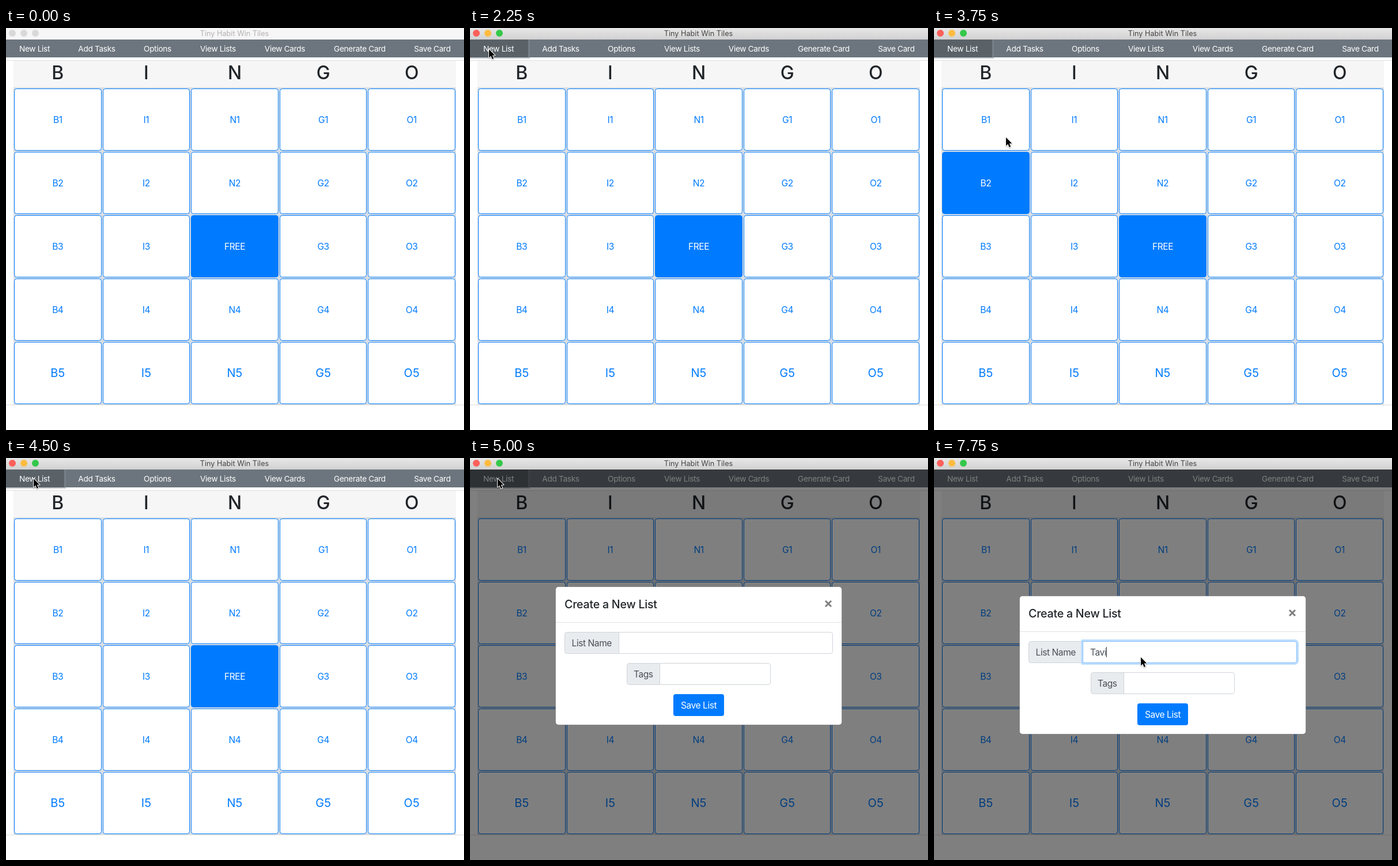
Animation, 795 px wide and 698 px high, one loop 8 s. Source, as an HTML page with a canvas:

```html
<!DOCTYPE html>
<html lang="en">
<head>
<meta charset="utf-8">
<title>Tiny Habit Win Tiles</title>
<style>
html, body { margin: 0; width: 100%; height: 100%; overflow: hidden; background: #fff; }
canvas { display: block; width: 795px; height: 698px; }
</style>
</head>
<body>
<canvas id="stage" width="795" height="698"></canvas>
<script>
const ctx = document.getElementById('stage').getContext('2d');
const LOOP = 8000, TICK = 250;
const BLUE = [0, 123, 255], WHITE = [255, 255, 255];
const TITLE = 'Tiny Habit Win Tiles', TYPED = 'Tavi';
const NAV = [['New List', 49.5], ['Add Tasks', 157.5], ['Options', 263], ['View Lists', 368],
  ['View Cards', 484], ['Generate Card', 614], ['Save Card', 740]];

// Pointer stops: time, x, y
const PATH = [
  [250, 638, 103], [500, 400, 80], [750, 185, 40], [1000, 70, 24], [1250, 31, 36], [1500, 33, 37],
  [2750, 33, 37], [3000, 178, 246], [3250, 190, 256], [3500, 186, 250], [3750, 125, 190],
  [4000, 62, 95], [4250, 49, 40], [4500, 48, 36], [5250, 48, 36],
  [5500, 140, 150], [5750, 318, 318], [6000, 359, 346]
];

// Hover fades: cell, time, strength
const HOVERS = [['B1', 3000, .35], ['B2', 3000, .02], ['I2', 3250, 1], ['I2', 3500, 1],
  ['B2', 3750, 1], ['B1', 4000, .35]];

const clamp = v => Math.max(0, Math.min(1, v));
const mix = (a, b, p) => `rgb(${a.map((v, i) => Math.round(v + (b[i] - v) * p)).join()})`;

function rect(x, y, w, h, fill) {
  ctx.fillStyle = fill;
  ctx.fillRect(x, y, w, h);
}

function box(x, y, w, h, radii, fill, stroke) {
  ctx.beginPath();
  if (stroke) ctx.roundRect(x + .5, y + .5, w - 1, h - 1, radii);
  else ctx.roundRect(x, y, w, h, radii);
  ctx.fillStyle = fill;
  ctx.fill();
  if (stroke) {
    ctx.lineWidth = 1;
    ctx.strokeStyle = stroke;
    ctx.stroke();
  }
}

// y is the middle of the capitals
function text(str, x, y, size, color, { weight = 400, align = 'center', track = 0 } = {}) {
  ctx.font = `${weight} ${size}px Inter, Roboto, sans-serif`;
  ctx.letterSpacing = `${track * size}px`;
  ctx.textAlign = align;
  ctx.fillStyle = color;
  ctx.fillText(str, x, Math.round(y + size * .364));
  return ctx.measureText(str).width;
}

function pointerAt(t) {
  if (t < PATH[0][0]) return null;
  let i = 0;
  while (i < PATH.length - 1 && PATH[i + 1][0] <= t) i++;
  const a = PATH[i], b = PATH[i + 1] || a;
  const p = b === a ? 0 : (t - a[0]) / (b[0] - a[0]);
  return [a[1] + (b[1] - a[1]) * p, a[2] + (b[2] - a[2]) * p];
}

function drawPointer([x, y]) {
  ctx.save();
  ctx.translate(x, y);
  ctx.beginPath();
  [[0, 0], [0, 14.5], [3.3, 11.4], [5.7, 17], [8.2, 16], [5.8, 10.5], [10.4, 10.5]]
    .forEach(p => ctx.lineTo(...p));
  ctx.closePath();
  ctx.shadowColor = 'rgba(0,0,0,.3)';
  ctx.shadowBlur = 2;
  ctx.shadowOffsetY = 1;
  ctx.lineWidth = 2;
  ctx.lineJoin = 'round';
  ctx.strokeStyle = '#fff';
  ctx.stroke();
  ctx.shadowColor = 'transparent';
  ctx.fillStyle = '#000';
  ctx.fill();
  ctx.restore();
}

function drawTitleBar(active) {
  const g = ctx.createLinearGradient(0, 0, 0, 20);
  g.addColorStop(0, active ? '#e7e7e7' : '#f6f6f6');
  g.addColorStop(1, active ? '#d1d1d1' : '#f6f6f6');
  rect(0, 0, 795, 20, g);
  const lights = active ? ['#fc605b', '#fdbc40', '#34c84a'] : Array(3).fill('#d9d9d9');
  lights.forEach((c, i) => {
    ctx.beginPath();
    ctx.arc(11 + 20 * i, 9, 6, 0, 7);
    ctx.fillStyle = c;
    ctx.fill();
  });
  text(TITLE, 396.5, 9.5, 12.7, active ? '#444' : '#b2b2b2');
}

function drawNav(focused) {
  rect(0, 20, 795, 31, '#6c757d');
  if (focused) {
    rect(0, 20, 104, 33, 'rgba(130,138,145,.5)');
    rect(0, 20, 101, 31, '#5a6268');
  }
  NAV.forEach(([label, x]) => text(label, x, 36, 13.7, '#fff', { track: -.025 }));
}

function drawBoard(t) {
  rect(0, 56, 795, 1, '#dfdfdf');
  rect(13, 57, 768, 46, '#f6f6f7');
  rect(13, 103, 768, 552, '#d9dee3');
  rect(0, 654, 795, 1, '#dfdfdf');
  [...'BINGO'].forEach((letter, col) => {
    const left = 13 + 153.6 * col, mid = left + 76.8;
    text(letter, mid, 77, 32, '#212529', { weight: 500 });
    const x = Math.round(left + 1), w = Math.round(left + 152.6) - x;
    for (let row = 1; row <= 5; row++) {
      const id = letter + row, free = id === 'N3';
      const hover = HOVERS.find(h => h[0] === id && h[1] === t);
      const p = free ? 1 : hover ? hover[2] : 0;
      const y = 110 * row - 5;
      box(x, y, w, 108, 4, mix(WHITE, BLUE, p), mix(BLUE, BLUE, 0));
      const big = row === 5;
      text(free ? 'FREE' : id, mid, y + 54, big ? 20 : 15.6, mix(BLUE, WHITE, p),
        { track: big ? 0 : -.03 });
    }
  });
}

function drawField(x, y, w, labelW, label, focused) {
  box(x, y, labelW + 1, 38, [4, 0, 0, 4], '#e9ecef', '#ced4da');
  text(label, x + labelW / 2 + .3, y + 19, 15.6, '#495057', { track: -.03 });
  const left = x + labelW, width = w - labelW;
  if (focused) box(left - 3, y - 3, width + 6, 44, [3, 7, 7, 3], '#bfdeff');
  box(left, y, width, 38, [0, 4, 4, 0], '#fff', focused ? '#80bdff' : '#ced4da');
}

function drawDialog(y, t) {
  const focused = t >= 6000;
  box(148, y, 498, 241, 5, '#fff', 'rgba(0,0,0,.25)');
  text('Create a New List', 164, y + 31, 19.6, '#212529', { weight: 500, align: 'left', track: -.012 });
  ctx.beginPath();
  for (const s of [-1, 1]) {
    ctx.moveTo(617, y + 30 + 5 * s);
    ctx.lineTo(627, y + 30 - 5 * s);
  }
  ctx.lineWidth = 3;
  ctx.strokeStyle = '#7f7f7f';
  ctx.stroke();
  rect(149, y + 62, 496, 1, '#dee2e6');

  drawField(164, y + 79, 466, 94, 'List Name', focused);
  drawField(272, y + 133, 250, 57, 'Tags', false);
  box(353, y + 187, 88, 38, 4, '#007bff');
  text('Save List', 397, y + 206, 15.6, '#fff', { track: -.03 });

  if (!focused) return;
  const count = Math.max(0, Math.floor((t - 7000) / TICK) + 1);
  const width = text(TYPED.slice(0, count), 271, y + 98, 15.6, '#495057', { align: 'left', track: -.03 });
  const caretOn = count > 0 || t < 6500;
  if (caretOn) rect(271 + Math.round(width), y + 89, 1, 18, '#333');
}

function draw(t) {
  const active = t >= 2250;
  rect(0, 0, 795, 698, '#fff');
  drawNav(active && t < 5500);
  drawBoard(t);
  const shade = t < 4750 ? 0 : .16 + .34 * clamp((t - 4750) / 250);
  if (shade) rect(0, 20, 795, 678, `rgba(0,0,0,${shade})`);
  drawTitleBar(active);
  if (t >= 5000) drawDialog(223 + 16 * clamp((t - 5000) / 250), t);
  const pointer = pointerAt(t);
  if (pointer) drawPointer(pointer);
}

const start = performance.now();
function frame() {
  const t = (performance.now() - start) % LOOP;
  draw(Math.floor(t / TICK) * TICK);
  requestAnimationFrame(frame);
}
frame();
</script>
</body>
</html>
```
